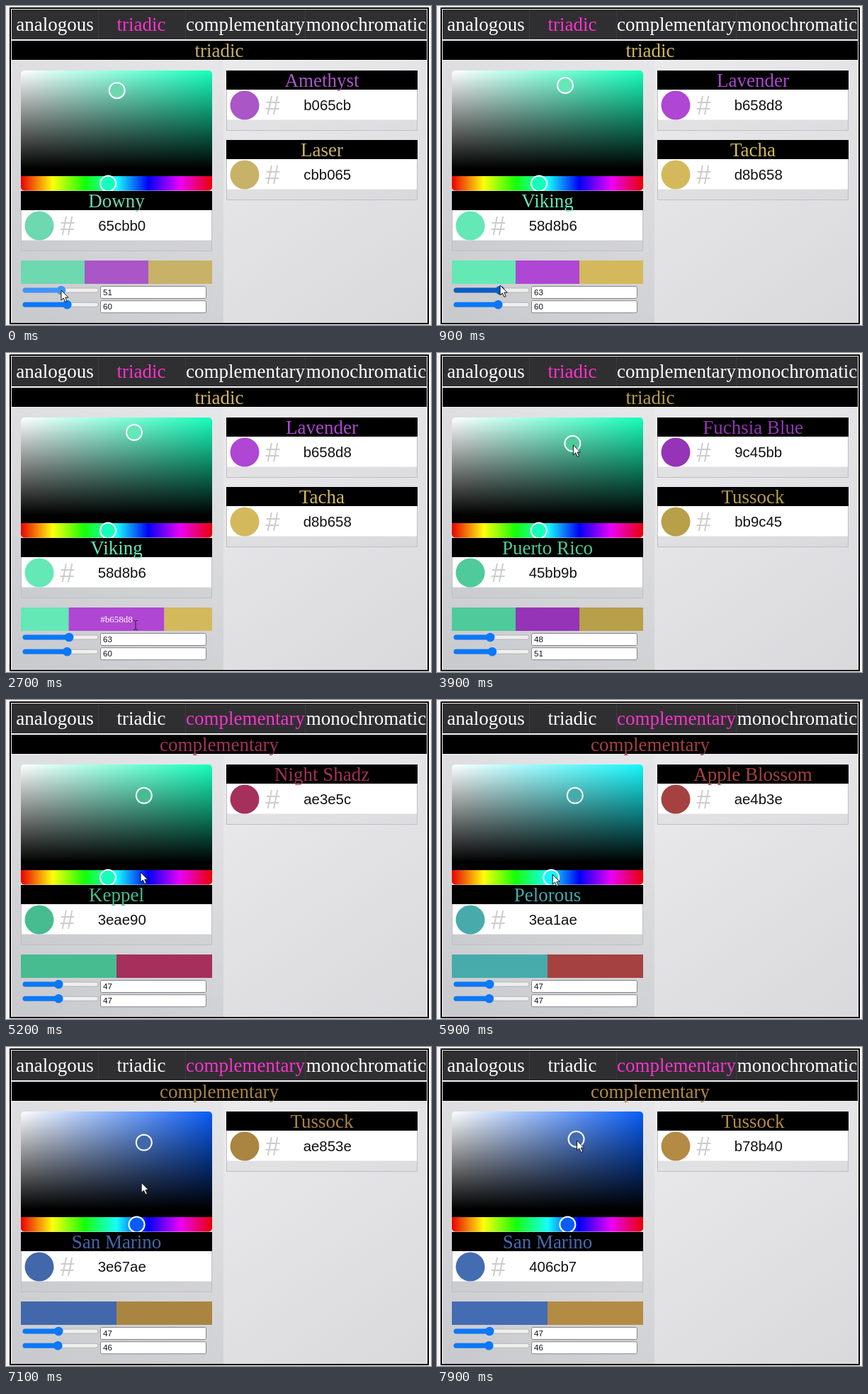
An HTML page with a canvas that plays this animation: 600 px wide and 450 px high, repeating every 8 s.

```html
<!DOCTYPE html>
<html lang="en">
<head>
<meta charset="utf-8">
<title>Colour harmony picker</title>
<style>
html, body { margin: 0; width: 100%; height: 100%; overflow: hidden; background: #f4f4f5; }
canvas { display: block; }
</style>
</head>
<body>
<canvas id="stage" width="600" height="450"></canvas>
<script>
const ctx = document.getElementById('stage').getContext('2d');
const LOOP = 8000, STEP = 100, SWITCH = 4800;
const SERIF = '27px "Liberation Serif", "Times New Roman", serif';
const SANS = '"Liberation Sans", Arial, sans-serif';
const AREA = { x: 21, y: 91, w: 270, h: 138 };
const TABS = [['analogous', 69], ['triadic', 191], ['complementary', 338], ['monochromatic', 508.5]];

// Each drag: start, end, resulting colour, saturation and lightness readings
const drags = [
  [0, 0, '65cbb0', 51, 60],
  [0, 900, '58d8b6', 63, 60],
  [3600, 3900, '45bb9b', 48, 51],
  [3900, 4300, '3eae90', 47, 47],
  [5500, 6300, '3e76ae', 47, 46],
  [6500, 6900, '3e67ae', 47, 46],
  [7300, 7700, '406cb7', 47, 46]
].map(([start, end, hex, ...readings]) => ({ start, end, values: [...toHsv(hex), ...readings] }));

const names = [
  [0, 'Downy', 'Amethyst', 'Laser'],
  [500, 'Viking', 'Lavender', 'Tacha'],
  [3700, 'Puerto Rico', 'Fuchsia Blue', 'Tussock'],
  [4200, 'Keppel', 'Fuchsia Blue', 'Tussock'],
  [SWITCH, 'Keppel', 'Night Shadz'],
  [5700, 'Pelorous', 'Apple Blossom'],
  [6000, 'Boston Blue', 'Brown Rust'],
  [6200, 'Steel Blue', 'Brown Rust'],
  [6800, 'San Marino', 'Tussock']
];

// Places the pointer visits; some follow the dragged control
const swatch = i => () => [83 + 100 * i, 384];
const thumb = s => [thumbX(s.sat), s.sat > 57 ? 394 : 401];
const marker = s => [s.x + 1, s.y + 2];
const hueKnob = s => [s.hueX + 2, 246];
const hueBar = () => [190, 243];
const tab = () => [332, 30];
const route = [
  [0, thumb], [900, thumb], [1400, swatch(0)], [1900, swatch(0)], [2200, swatch(1)], [2700, swatch(1)],
  [3100, swatch(2)], [3600, marker], [4300, marker], [SWITCH, tab], [5200, hueBar],
  [5500, hueKnob], [6900, hueKnob], [7300, marker], [LOOP, marker]
];

const mix = (a, b, p) => a.map((v, i) => v + (b[i] - v) * p);
const thumbX = value => 30.5 + value * .93;

function parse(hex) {
  return hex.match(/../g).map(c => parseInt(c, 16));
}

function format(rgb) {
  return rgb.map(c => Math.round(Math.max(0, Math.min(255, c)) + 1e-6).toString(16).padStart(2, '0')).join('');
}

function toHsv(hex) {
  const [r, g, b] = parse(hex);
  const max = Math.max(r, g, b), d = max - Math.min(r, g, b);
  const h = max === g ? 2 + (b - r) / d : max === b ? 4 + (r - g) / d : (g - b) / d;
  return [h * 60, d / max, max / 255];
}

function toHex(h, s, v) {
  return format([5, 3, 1].map(n => {
    const k = (n + h / 60) % 6;
    return 255 * v * (1 - s * Math.max(0, Math.min(k, 4 - k, 1)));
  }));
}

// Screen colour after a BT.709 to BT.601 matrix shift
function tone(hex) {
  const [r, g, b] = parse(hex);
  return '#' + format([
    .914 * r + .078 * g + .008 * b,
    -.105 * r + 1.172 * g - .067 * b,
    .01 * r + .032 * g + .958 * b
  ]);
}

function stateAt(t) {
  const i = drags.findLastIndex(d => d.start <= t), { start, end, values } = drags[i];
  const [h, s, v, sat, light] = mix(drags[i - 1].values, values, Math.min(1, (t - start) / (end - start)));
  return {
    h, s, v, sat, light,
    x: AREA.x + AREA.w * s, y: AREA.y + AREA.h * (1 - v), hueX: AREA.x + AREA.w * h / 360
  };
}

function cursorAt(t, state) {
  const i = route.findLastIndex(r => r[0] <= t), [t0, from] = route[i], [t1, to] = route[i + 1];
  return mix(from(state), to(state), (t - t0) / (t1 - t0));
}

function rect(x, y, w, h, fill) {
  ctx.fillStyle = fill;
  ctx.fillRect(x, y, w, h);
}

function rounded(x, y, w, h, r, fill, stroke) {
  ctx.beginPath();
  ctx.roundRect(x, y, w, h, r);
  ctx.fillStyle = fill;
  ctx.fill();
  if (stroke) {
    ctx.strokeStyle = stroke;
    ctx.lineWidth = 1;
    ctx.stroke();
  }
}

function disc(x, y, r, fill, ring) {
  ctx.beginPath();
  ctx.arc(x, y, r, 0, 7);
  ctx.fillStyle = fill;
  ctx.fill();
  if (ring) {
    ctx.strokeStyle = '#fff';
    ctx.lineWidth = 2;
    ctx.stroke();
  }
}

function text(str, x, y, fill, font = SERIF, align = 'center') {
  ctx.font = font;
  ctx.textAlign = align;
  ctx.fillStyle = fill;
  ctx.fillText(str, x, y);
}

function gradient(x0, y0, x1, y1, ...stops) {
  const g = ctx.createLinearGradient(x0, y0, x1, y1);
  stops.forEach((c, i) => g.addColorStop(i / (stops.length - 1), c));
  return g;
}

function drawFrame(mode, accent) {
  rect(0, 0, 600, 450, '#f4f4f5');
  rect(8, 77, 299, 370, gradient(250, 60, 50, 450, '#e6e6e8', '#c9cacd'));
  rect(307, 77, 287, 370, gradient(330, 80, 590, 450, '#eaeaec', '#d9d9dc'));
  ctx.strokeStyle = '#000';
  ctx.lineWidth = 2;
  ctx.strokeRect(6, 3, 590, 445);
  rect(8, 5, 586, 42, '#2f2f31');
  for (const x of [130, 253, 422]) rect(x, 5, 1, 42, '#3b3b3e');
  TABS.forEach(([name, x]) => text(name, x, 35, name === mode ? '#fa33cc' : '#fff'));
  rect(8, 49, 586, 27, '#000');
  text(mode, 301, 72, accent);
}

function drawPicker({ h, x, y, hueX }, color) {
  const { x: left, y: top, w, h: height } = AREA, pure = tone(toHex(h, 1, 1));
  const rainbow = Array.from({ length: 7 }, (_, i) => tone(toHex(i * 60, 1, 1)));
  const corners = [5, 5, 0, 0];
  rounded(left, top, w, height + 11, corners, gradient(left, 0, left + w, 0, '#fff', pure));
  rounded(left, top, w, height + 11, corners, gradient(0, top, 0, top + height, '#0000', '#000'));
  rounded(left, 240, w, 20.5, [0, 0, 5, 5], gradient(left, 0, left + w, 0, ...rainbow));
  disc(hueX, 250.5, 11, pure, true);
  disc(x, y, 11, color, true);
}

function drawCard(x, y, name, hex) {
  const color = tone(hex);
  rounded(x + .5, y + .5, 269, 84, 0, '#8888880f', '#bfbfc3');
  rect(x, y, 270, 27, '#000');
  rect(x + 1, y + 27, 268, 42.5, '#fff');
  text(name, x + 135, y + 23, color);
  disc(x + 26, y + 49, 20.5, color);
  text('#', x + 65.5, y + 62, '#ccc', '36px ' + SANS);
  text(hex, x + 142.7, y + 56, '#111', '20.4px ' + SANS);
}

function inStrip(x, y) {
  return y > 359 && y < 392 && x > 21 && x < 291;
}

function drawStrip(colors, [cx, cy]) {
  const hovered = inStrip(cx, cy) ? Math.floor((cx - 21) * colors.length / 270) : -1;
  const unit = 270 / (colors.length + (hovered >= 0));
  let x = 21;
  colors.forEach((hex, i) => {
    const w = i === hovered ? unit * 2 : unit;
    rect(x, 359, w, 33, tone(hex));
    if (i === hovered) text('#' + hex, x + w / 2, 380, '#fff', SERIF.replace('27px', '13px'));
    x += w;
  });
}

function drawSlider(y, value, color) {
  const x = thumbX(value);
  rounded(24, y - 3, 106, 6, 3, '#efefef', '#b5b5b8');
  rounded(23.5, y - 3.5, x - 23.5, 7, 3.5, color);
  disc(x, y, 6.3, color);
  rounded(133.5, y - 5.5, 149, 17, 2, '#fff', '#85858a');
  text(Math.round(value), 137, y + 7, '#111', '11.5px ' + SANS, 'left');
}

function drawCursor(x, y) {
  ctx.lineWidth = 1;
  if (inStrip(x, y)) {
    ctx.strokeStyle = '#222';
    ctx.stroke(new Path2D(`M${x - 3} ${y - 6.5}h2l1 1l1 -1h2M${x} ${y - 6}v12M${x - 3} ${y + 6.5}h2l1 -1l1 1h2`));
    return;
  }
  const arrow = new Path2D(`M${x} ${y}v14l3.3 -3l2.5 5.5l2.4 -1l-2.5 -5.3h4.4z`);
  ctx.fillStyle = '#fff';
  ctx.fill(arrow);
  ctx.strokeStyle = '#111';
  ctx.stroke(arrow);
}

function draw(t) {
  const state = stateAt(t), { h, s, v, sat, light } = state;
  const cursor = cursorAt(t, state);
  const triadic = t < SWITCH;
  const main = toHex(h, s, v);
  const others = (triadic ? [120, 240] : [180]).map(turn => toHex((Math.round(h) + turn) % 360, s, v));
  const [, mainName, ...otherNames] = names.findLast(n => n[0] <= t);

  drawFrame(triadic ? 'triadic' : 'complementary', tone(others.at(-1)));
  drawPicker(state, tone(main));
  drawCard(21, 261, mainName, main);
  others.forEach((hex, i) => drawCard(311, 91 + 98 * i, otherNames[i], hex));
  drawStrip([main, ...others], cursor);
  drawSlider(401, sat, tone(t < 900 ? '3793ff' : t < 1200 ? '005cc8' : '0075ff'));
  drawSlider(421.3, light, tone('0075ff'));
  drawCursor(...cursor);
}

function tick() {
  draw(Math.floor(performance.now() % LOOP / STEP) * STEP);
  requestAnimationFrame(tick);
}
tick();
</script>
</body>
</html>
```
